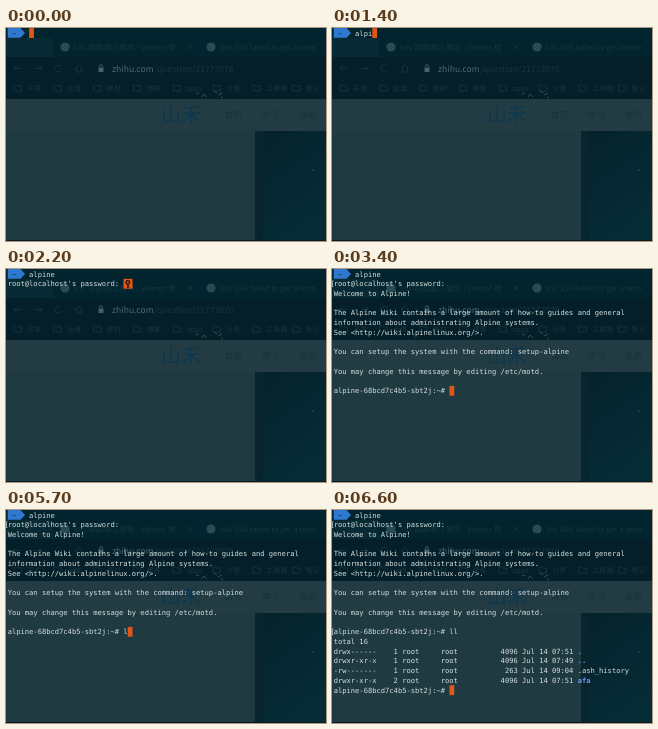
These frames come from a looping animation (320 by 213 pixels, 7.4 s). An HTML page:

```html
<!DOCTYPE html>
<html lang="en">
<head>
<meta charset="utf-8">
<title>Terminal session</title>
<style>
  html, body { margin: 0; width: 100%; height: 100%; overflow: hidden; background: #02242e; }
  svg { display: block; width: 100%; height: 100%; }
  text { white-space: pre; text-rendering: geometricPrecision; }
  .ui { font-family: "Noto Sans CJK SC", "Noto Sans CJK", "Noto Sans", sans-serif; fill: #17363f; font-size: 7.6px; }
  .line { fill: none; stroke: #17363f; stroke-width: .9; }
  .mark { font-size: 7.2px; }
  .url { font-size: 8.6px; }
  .nav { font-size: 8.5px; fill: #15323c; }
  .brand { font-size: 20px; font-weight: 400; fill: #0d3850; }
  .term { font-family: "DejaVu Sans Mono", monospace; font-size: 7.12px; fill: #d3dedd; }
  .dir { fill: #6a97f5; font-weight: bold; }
</style>
</head>
<body>
<svg viewBox="0 0 320 213">
  <defs>
    <linearGradient id="sea" x1="0" y1="0" x2="0.4" y2="1">
      <stop offset="0" stop-color="#04222c"/>
      <stop offset="1" stop-color="#062c36"/>
    </linearGradient>
  </defs>

  <!-- Dimmed browser behind the terminal -->
  <g id="browser">
    <rect width="320" height="29" fill="#02242e"/>
    <path d="M0 10H43Q47 10 47 14V25Q47 29 51 29H0Z" fill="#082a34"/>
    <rect y="29" width="320" height="42" fill="#041f29"/>
    <rect y="71" width="320" height="32" fill="#233c44"/>
    <rect y="103" width="249" height="110" fill="#203a42"/>
    <rect x="249" y="103" width="8" height="110" fill="#08242e"/>
    <rect x="257" y="103" width="63" height="110" fill="url(#sea)"/>
    <rect y="212" width="320" height="1" fill="#061a22"/>

    <g fill="#2a4a54">
      <circle cx="59" cy="19" r="4.6"/>
      <circle cx="205" cy="19" r="4.6"/>
    </g>
    <text class="ui" x="68" y="21.8">k8s 容器端口 服务 - Velmor 搜</text>
    <text class="ui" x="214" y="21.8">k8s SSH failed to get a term</text>
    <path class="line" d="M182 17l4 4m0-4l-4 4"/>

    <path class="line" d="M15 40.5H8m3-3l-3 3l3 3M29 40.5h7m-3-3l3 3l-3 3M55 38.5a3.4 3.4 0 1 0 .5 3.5M69 41l4-4l4 4m-6.5-1v4h5v-4"/>
    <rect x="92.5" y="39.5" width="5" height="4.5" fill="#456069"/>
    <path d="M93.6 39.5v-1.4a1.4 1.4 0 0 1 2.8 0v1.4" fill="none" stroke="#456069" stroke-width=".9"/>
    <text class="ui url" x="106" y="43.8"><tspan fill="#4d6871">zhihu.com</tspan>/question/21773976</text>

    <g id="marks"></g>
    <path d="M190 66l3-1M196 69l2-3l3 3M208 63l3 2M212 67l4-2M215 69l2 1" fill="none" stroke="#3d5860" stroke-width=".8"/>
    <text class="ui brand" x="155" y="93.6">山禾</text>
    <g id="nav"></g>
    <g fill="#234853">
      <circle cx="307" cy="142" r=".9"/><circle cx="284" cy="121" r=".5"/>
      <circle cx="268" cy="158" r=".5"/><circle cx="313" cy="110" r=".5"/>
    </g>
  </g>

  <!-- Shell prompt -->
  <path d="M1.7 0H14.6L19 4.9L14.6 9.8H1.7Z" fill="#2f78cf"/>
  <text class="term" x="6" y="7.5" style="fill:#0b2630">~</text>

  <g id="rows"></g>
  <rect id="cursor" height="9.8" fill="#e2561a"/>
  <g id="key" fill="none" stroke="#1c1512">
    <circle cx="121.8" cy="13.4" r="1.8" stroke-width="1.3"/>
    <path d="M121.8 15.2V19M121.8 17.8h1.5" stroke-width="1.2"/>
  </g>
</svg>

<script>
const NS = "http://www.w3.org/2000/svg";
const LOOP = 7400, LEFT = 1.7, COL = 4.287, ROW = 9.73;
const byId = id => document.getElementById(id);

function add(parent, tag, attrs, content = "") {
  const node = document.createElementNS(NS, tag);
  for (const name in attrs) node.setAttribute(name, attrs[name]);
  node.textContent = content;
  return parent.appendChild(node);
}

["开发", "运维", "素材", "博客", "apps", "分享", "工具箱", "笔记"].forEach((label, i) => {
  const x = 8 + i * 39.8;
  add(byId("marks"), "path", { d: `M${x} 57h2.5l1 1h4v5h-7.5z`, class: "line" });
  add(byId("marks"), "text", { x: x + 13, y: 62.6, class: "ui mark" }, label);
});
["首页", "学习", "会员"].forEach((label, i) =>
  add(byId("nav"), "text", { x: 219 + i * 37, y: 90, class: "ui nav" }, label));

const PASSWORD = "root@localhost's password:";
const SHELL = "alpine-68bcd7c4b5-sbt2j:~# ";
const MOTD = [
  "Welcome to Alpine!", "",
  "The Alpine Wiki contains a large amount of how-to guides and general",
  "information about administrating Alpine systems.",
  "See <http://wiki.alpinelinux.org/>.", "",
  "You can setup the system with the command: setup-alpine", "",
  "You may change this message by editing /etc/motd.", ""
];
const entry = (mode, links, size, time) =>
  `${mode}    ${links} root     root     ${String(size).padStart(9)} Jul 14 ${time} `;
const LISTING = [
  ["total 16"],
  [entry("drwx------", 1, 4096, "07:51"), "."],
  [entry("drwxr-xr-x", 1, 4096, "07:49"), ".."],
  [entry("-rw-------", 1, 263, "09:04") + ".ash_history"],
  [entry("drwxr-xr-x", 2, 4096, "07:51"), "afa"]
];

const typed = (word, times, t) => word.slice(0, times.filter(at => t >= at).length);

// Each line is [plain text, directory name]; the cursor follows the last line.
function screenAt(t) {
  const lines = [["     " + typed("alpine", [700, 800, 1100, 1400, 1500, 1600], t)]];
  const marks = [];
  const secret = t >= 2200 && t < 3400;
  if (t >= 2000) lines.push([t < 2200 ? "" : PASSWORD + (secret ? " " : "")]);
  if (t >= 3400) {
    marks.push(1);
    MOTD.forEach(s => lines.push([s]));
    lines.push([SHELL + typed("ll", [5700, 5800], t)]);
  }
  if (t >= 6100) {
    marks.push(12);
    if (t < 6200) lines.push([""]);
    else lines.push(...LISTING, [SHELL]);
  }
  return { lines, marks, secret };
}

let shown = "";
function draw(t) {
  const { lines, marks, secret } = screenAt(t);
  const state = JSON.stringify([lines, secret]);
  if (state === shown) return;
  shown = state;

  const rows = byId("rows");
  rows.replaceChildren();
  lines.forEach(([plain, dir], i) => {
    const y = i * ROW + 7.5;
    const line = add(rows, "text", { x: LEFT, y, class: "term" });
    add(line, "tspan", {}, plain);
    if (dir) add(line, "tspan", { class: "dir" }, dir);
    if (marks.includes(i)) add(rows, "text", { x: -1.6, y, class: "term" }, "[");
  });

  const last = lines.length - 1, cursor = byId("cursor");
  cursor.setAttribute("x", LEFT + lines[last][0].length * COL);
  cursor.setAttribute("y", last * ROW + 0.15);
  cursor.setAttribute("width", (secret ? 2 : 1) * COL + 0.5);
  byId("key").style.display = secret ? "" : "none";
}

function tick() {
  draw(performance.now() % LOOP);
  requestAnimationFrame(tick);
}
tick();
</script>
</body>
</html>
```
